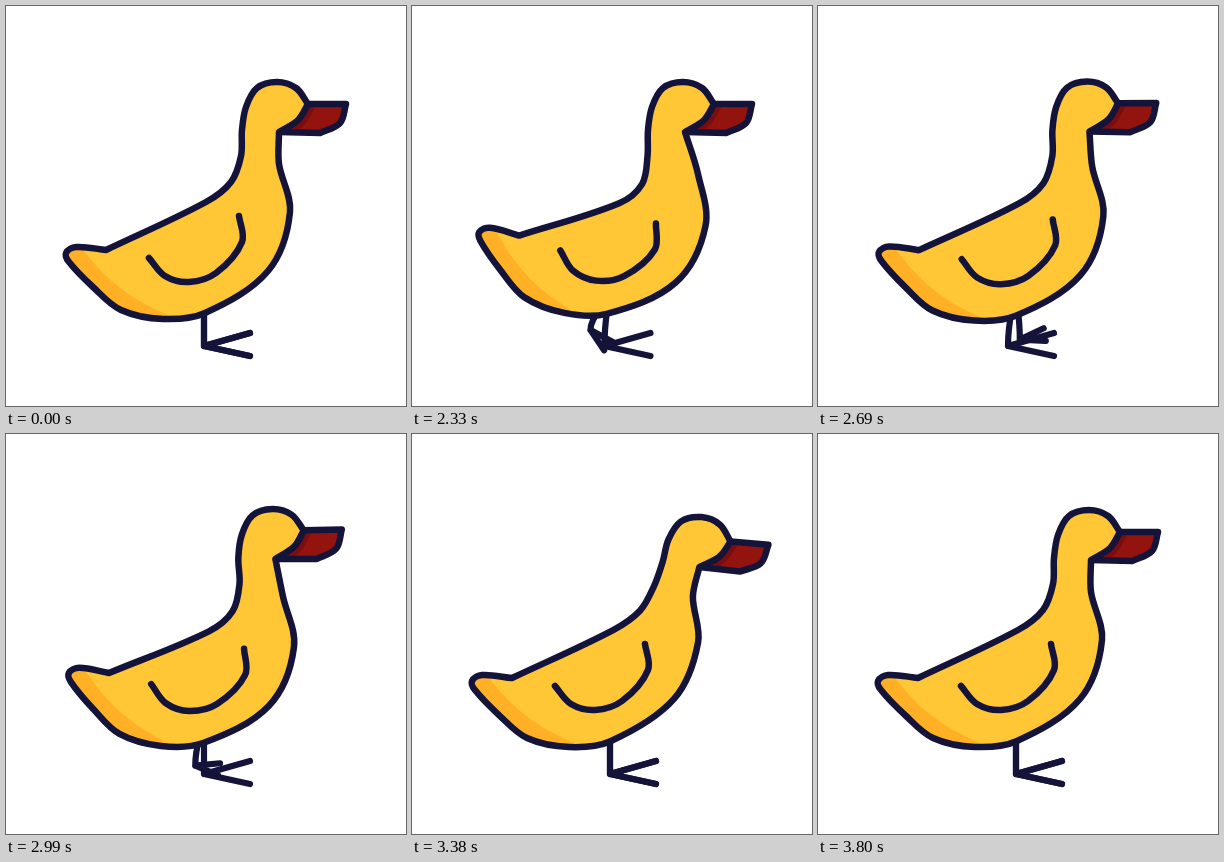
Recreate the animation shown at these times as an HTML page with a canvas. Size 400 by 400 pixels, loop 3.83 s.

```html
<!DOCTYPE html>
<html>
<head>
<meta charset="utf-8">
<style>
html, body { margin: 0; width: 100%; height: 100%; overflow: hidden; background: #fff; }
canvas { display: block; width: 400px; height: 400px; }
</style>
</head>
<body>
<canvas id="stage" width="400" height="400"></canvas>
<script>
const ctx = document.getElementById('stage').getContext('2d');
const LOOP = 3830, START = 2030, STEP = 30;
const INK = '#14133a', YELLOW = '#ffc636', ORANGE = '#ffb024', RED = '#93130e', DARK_RED = '#7a0e0e';

// Key points of the resting duck, joined by smooth curves
const BACK = [[100,244],[200,196],[225,176],[235,150],[236,124],[240,101],[251,82],[271,76],[290,82],[302,98]];
const JAW = [[302,98],[292,114],[273,126]];
const FRONT = [[273,126],[273,158],[284,206],[262,265],[199,307],[157,313],[115,304],[87,281],[63,256],[60,247],[70,241],[100,244]];
const BEAK = [[340,98],[334,117],[314,127]];
const WING = [[143,252],[159,270],[183,276],[210,267],[236,236],[233,210]];
const SHADE = [[74,241],[100,270],[130,293],[168,312]];

const clamp = v => Math.max(0, Math.min(1, v));
const ease = u => u * u * (3 - 2 * u);
// Rises from a to b, falls from b to c
const bump = (t, a, b, c) => ease(clamp(t < b ? (t - a) / (b - a) : (c - t) / (c - b)));

// Turn about (cx, cy), then shift
function turn(cx, cy, deg, dx, dy) {
  const r = deg * Math.PI / 180, cos = Math.cos(r), sin = Math.sin(r);
  return ([x, y]) => [cx + dx + (x - cx) * cos - (y - cy) * sin, cy + dy + (x - cx) * sin + (y - cy) * cos];
}

// Smooth curve through the points; each handle is a third of its span
function spline(path, pts) {
  const last = pts.length - 1;
  const dir = i => {
    const a = pts[Math.max(0, i - 1)], b = pts[Math.min(last, i + 1)];
    const d = Math.hypot(b[0] - a[0], b[1] - a[1]);
    return [(b[0] - a[0]) / d, (b[1] - a[1]) / d];
  };
  for (let i = 0; i < last; i++) {
    const [px, py] = pts[i], [qx, qy] = pts[i + 1];
    const [ax, ay] = dir(i), [bx, by] = dir(i + 1);
    const h = Math.hypot(qx - px, qy - py) / 3;
    path.bezierCurveTo(px + ax * h, py + ay * h, qx - bx * h, qy - by * h, qx, qy);
  }
}

function shape(...runs) {
  const path = new Path2D();
  path.moveTo(...runs[0][0]);
  for (const run of runs) {
    path.lineTo(...run[0]);
    spline(path, run);
  }
  return path;
}

function ink(path, width = 6.5, color = INK) {
  ctx.strokeStyle = color;
  ctx.lineWidth = width;
  ctx.stroke(path);
}

function fill(path, color) {
  ctx.fillStyle = color;
  ctx.fill(path);
}

function inside(path, paint) {
  ctx.save();
  ctx.clip(path);
  paint();
  ctx.restore();
}

// A planted foot slides back, then swings forward between lift and land
function drawLeg(t, lift, land, stride) {
  const u = clamp((t - lift) / (land - lift));
  const slide = 8 * Math.sqrt(clamp((Math.min(t, lift) - 2000) / 690));
  const rise = Math.sin(Math.PI * u) * stride;
  const sway = Math.sin(2 * Math.PI * u) * (1 - u) * stride;
  const x = 198 - slide * (1 - u) - 48 * sway, y = 340 - 17 * rise;
  const hip = 198 + (x - 198) / 2;
  const size = 1 - .48 * clamp(2.5 * rise);
  const foot = turn(0, 0, 115 * sway, x, y);

  const path = new Path2D();
  path.moveTo(hip, 303);
  path.quadraticCurveTo(x, (306 + y) / 2, x, y);
  for (const toe of [-13, 10]) {
    path.moveTo(x, y);
    path.lineTo(...foot([46 * size, toe * size]));
  }
  ink(path, 6.2);
}

function draw(t) {
  const pitch = 9.3 * bump(t, 2030, 2330, 2750) + 5 * bump(t, 2600, 2930, 3160) - bump(t, 3110, 3220, 3400);
  const drop = 3 * bump(t, 2400, 2800, 3200);
  const pull = .55 * bump(t, 1980, 2060, 2330) + bump(t, 2420, 3020, 3200);
  const reach = bump(t, 3080, 3380, 3780);

  const torso = turn(192, 281, pitch, 0, drop);
  const head = turn(271, 100, 4.8 * reach - 1.2 * pull, 16.5 * reach - 4.2 * pull, 7 * reach - pull);
  // The neck stretches between torso and head
  const bend = p => {
    if (p[1] < 127) return head(p);
    const front = p[0] > 255, u = clamp((240 - p[1]) / 120);
    const hold = 1 - clamp(u * (front ? .45 : 1.3)), follow = front ? u : u * u;
    const a = torso(p), b = head(p);
    return p.map((v, i) => v + (a[i] - v) * hold + (b[i] - v) * follow);
  };

  ctx.fillStyle = '#fff';
  ctx.fillRect(0, 0, 400, 400);
  ctx.lineCap = ctx.lineJoin = 'round';

  drawLeg(t, 2040, 2780, 1);
  drawLeg(t, 2820, 3200, .5);

  const jaw = JAW.map(head);
  const beak = shape(BEAK.map(head), [...jaw].reverse());
  beak.closePath();
  fill(beak, RED);
  inside(beak, () => ink(shape(jaw), 16, DARK_RED));
  ink(beak);

  const body = shape(BACK.map(bend), jaw, FRONT.map(bend));
  body.closePath();
  fill(body, YELLOW);
  inside(body, () => {
    const shade = shape(SHADE.map(torso));
    shade.lineTo(168, 340);
    shade.lineTo(40, 340);
    shade.lineTo(40, 210);
    fill(shade, ORANGE);
  });
  ink(body);
  ink(shape(WING.map(torso)));
}

const t0 = performance.now();
function frame() {
  const t = (performance.now() - t0) % LOOP;
  draw(t < START ? 0 : START + Math.floor((t - START) / STEP) * STEP);
  requestAnimationFrame(frame);
}
frame();
</script>
</body>
</html>
```
